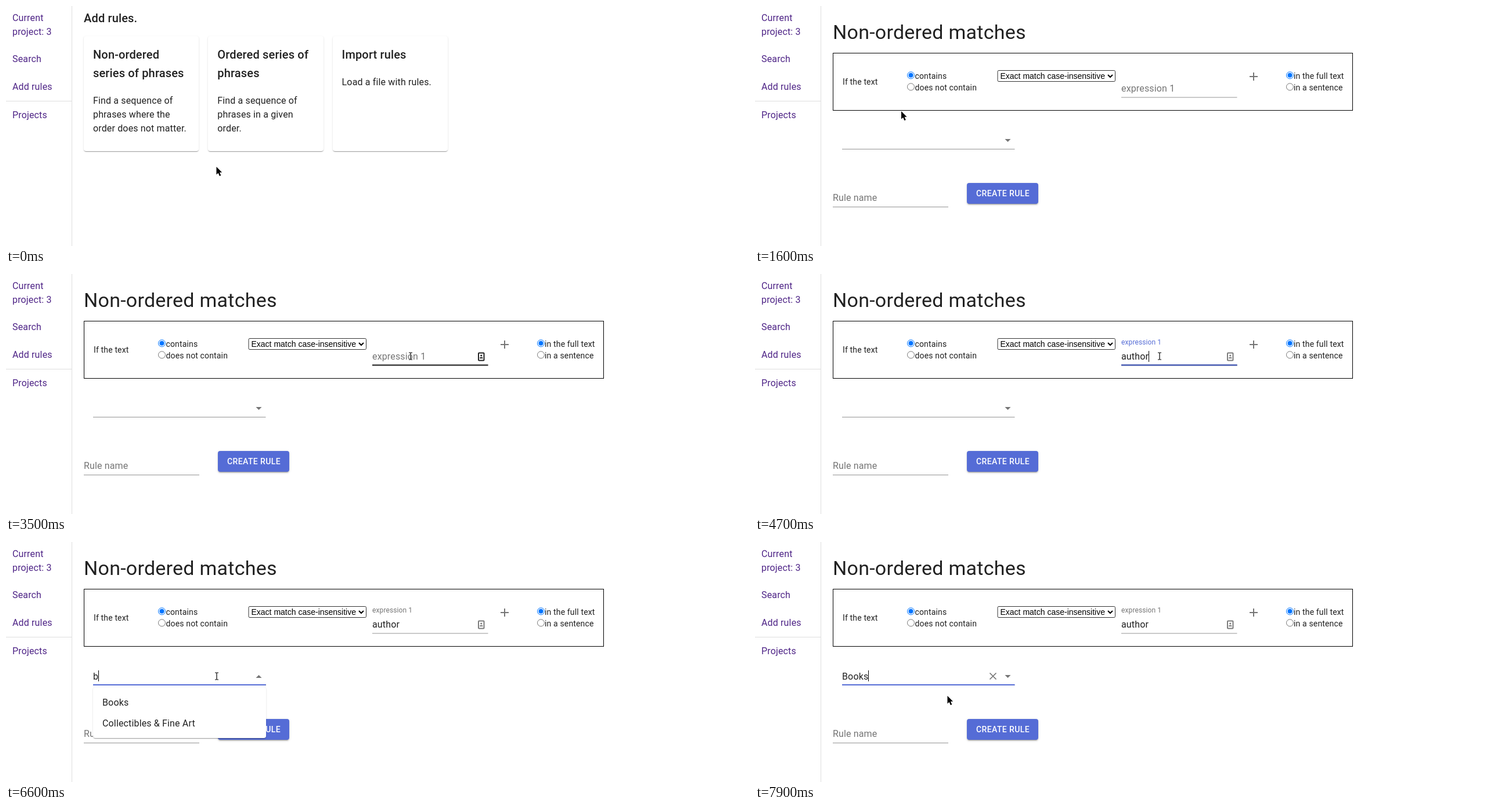
These frames come from a looping animation (1280 px wide and 415 px high, 8 s). An HTML page:

```html
<!DOCTYPE html>
<html lang="en">
<head>
<meta charset="utf-8">
<title>Add rules</title>
<style>
  html, body { margin: 0; width: 100%; height: 100%; overflow: hidden; background: #fff; }
  svg { display: block; }
  text { font: 16px Roboto, sans-serif; letter-spacing: .15px; fill: #212121; white-space: pre; }
  .nav text { fill: #4f2587; }
  .title { font-size: 20px; font-weight: 500; }
  .heading { font-size: 34px; letter-spacing: .25px; }
  .small text { font-size: 14px; }
  .small .select { font: 14px "Liberation Sans", Arial, sans-serif; letter-spacing: 0; fill: #000; }
  .hint { fill: #757575; }
  .button { font-size: 14px; font-weight: 500; letter-spacing: .4px; fill: #fff; }
  .line { fill: #949494; }
  .icon { fill: none; stroke: #757575; }
  foreignObject { overflow: visible; }
  .paper, .raised { height: 100%; border-radius: 4px; background: #fff;
    box-shadow: 0 2px 1px -1px rgba(0,0,0,.2), 0 1px 1px rgba(0,0,0,.14), 0 1px 3px rgba(0,0,0,.12); }
  .raised { background: #556cd6;
    box-shadow: 0 3px 1px -2px rgba(0,0,0,.2), 0 2px 2px rgba(0,0,0,.14), 0 1px 5px rgba(0,0,0,.12); }
  #cursor path { paint-order: stroke; stroke: #fff; stroke-width: 2; stroke-linejoin: round; }
</style>
</head>
<body>
<svg width="1280" height="415" viewBox="0 0 1280 415">
  <g class="nav">
    <text x="11" y="26">Current</text>
    <text x="11" y="50">project: 3</text>
    <text x="11" y="97">Search</text>
    <text x="11" y="145">Add rules</text>
    <text x="11" y="194">Projects</text>
    <path d="M113.5 0V415M0 164.5H113" stroke="#dedede"/>
  </g>

  <g id="menuPage"><text class="title" x="134" y="28">Add rules.</text></g>

  <g id="formPage">
    <text class="heading" x="134" y="57">Non-ordered matches</text>
    <rect x="134.5" y="81.5" width="895" height="99" fill="none" stroke="#000"/>
    <g class="small">
      <text x="151" y="136">If the text</text>
      <text x="275.5" y="126">contains</text>
      <text x="275.5" y="146">does not contain</text>
      <text x="928" y="126">in the full text</text>
      <text x="928" y="146">in a sentence</text>
      <g id="radios"></g>
      <rect id="select" x="418" y="111.5" width="202.5" height="19" rx="2" fill="#fff"/>
      <text class="select" x="422.5" y="126">Exact match case-insensitive</text>
      <path d="M608 119l4 4l4-4" fill="none" stroke="#000" stroke-width="2"/>
    </g>
    <path class="icon" d="M852 122h14M859 115v14" stroke-width="2"/>

    <text id="label" class="hint">expression 1</text>
    <text id="word" x="631" y="148"></text>
    <g id="card">
      <rect x="814" y="136.5" width="9.5" height="13" rx="1" fill="none" stroke-width="2"/>
      <circle cx="818.7" cy="141" r="1.6" stroke="none"/>
      <path d="M816 146v-1.3q2.7-2 5.4 0v1.3z" stroke="none"/>
    </g>
    <g id="wordLine"></g>

    <text id="category" x="150" y="238"></text>
    <path id="clear" class="icon" d="M404.500 226.500l11 11m0-11l-11 11" stroke-width="1.7"/>
    <path id="arrow" fill="#757575"/>
    <g id="categoryLine"></g>

    <text class="hint" x="134" y="337">Rule name</text>
    <rect class="line" x="134" y="347" width="199" height="1"/>
    <foreignObject x="365" y="306" width="123" height="36"><div class="raised"></div></foreignObject>
    <text class="button" x="381" y="329">CREATE RULE</text>

    <g id="popup">
      <foreignObject id="popupBox" x="150" y="251" width="297.500"><div class="paper"></div></foreignObject>
      <rect id="highlight" x="150" y="259" width="297.500" height="36" fill="#f5f5f5"/>
      <g id="options"></g>
    </g>
    <rect id="caret" width="1" height="19"/>
  </g>

  <g id="cursor">
    <path id="pointer" d="M0 0V13.500L3.100 10.700L5.400 16L7.800 15L5.500 9.800H9.600Z"/>
    <path id="beam" d="M-3-6.500h2.500l.5.500l.5-.5H3v1H.6V5.500H3v1H.5L0 6l-.5.500H-3v-1H-.6V-5.500H-3z" style="stroke-width:1"/>
    <path id="hand" d="M-1.500 1Q0-1 1.500 1V6Q3 5 4.300 6.500Q6 5.700 7 7.200Q9 6.500 9.500 8.500V12L8 17H-.5L-5 10.500Q-5 8.500-3 9.300L-1.500 11Z"/>
  </g>
</svg>

<script>
const $ = id => document.getElementById(id);
const LOOP = 8000, TICK = 100, BLUE = '#556cd6', DARK = '#212121';

// Static repeated parts
const cards = [
  [['Non-ordered', 'series of phrases'], ['Find a sequence of', 'phrases where the', 'order does not matter.']],
  [['Ordered series of', 'phrases'], ['Find a sequence of', 'phrases in a given', 'order.']],
  [['Import rules'], ['Load a file with rules.']],
];
cards.forEach(([title, body], i) => {
  const x = 134 + 214.3 * i, bodyTop = 105 + 32 * title.length;
  $('menuPage').innerHTML +=
    `<foreignObject x="${x}" y="52" width="198.3" height="199"><div class="paper"></div></foreignObject>` +
    title.map((s, n) => `<text class="title" x="${x + 16}" y="${91 + 32 * n}">${s}</text>`).join('') +
    body.map((s, n) => `<text x="${x + 16}" y="${bodyTop + 24 * n}">${s}</text>`).join('');
});

const radio = (x, y, on) => `<circle cx="${x}" cy="${y}" r="6" fill="#fff" stroke="${on ? '#0075ff' : '#767676'}"/>` +
  (on ? `<circle cx="${x}" cy="${y}" r="4" fill="#0075ff"/>` : '');
$('radios').innerHTML = [268.5, 921.5].map(x => radio(x, 119.8, true) + radio(x, 139.8, false)).join('');

const OPTIONS = ['Books', 'Collectibles &amp; Fine Art', 'Electronics', 'Fashion', 'Music'];
$('options').innerHTML = OPTIONS.map((s, i) => `<text x="166" y="${283 + 36 * i}">${s}</text>`).join('');

// Pointer way points: time, x, y
const path = [
  [0, 362.5, 278], [500, 362.5, 278], [700, 302, 230], [800, 268, 200], [900, 251, 185],
  [1000, 251, 185], [1100, 252, 182], [2100, 252, 182], [2600, 520, 127], [3000, 694, 142],
  [3400, 694, 142], [3500, 697, 142], [5100, 697, 142], [5200, 620, 160], [5300, 620, 160],
  [5700, 363, 232], [7200, 363, 232], [7500, 338, 263], [7600, 338, 263], [7700, 331.5, 266], [LOOP, 331.5, 266],
];

// Typed text: time, value
const wordKeys = [[0, ''], [4100, 'a'], [4200, 'au'], [4300, 'aut'], [4400, 'auth'], [4600, 'autho'], [4700, 'author']];
const categoryKeys = [[0, ''], [6600, 'b'], [6700, 'bo'], [7900, 'Books']];

const valueAt = (keys, t) => keys.filter(k => k[0] <= t).pop()[1];
const within = (t, from, to) => t >= from && t < to;
const show = (id, on) => $(id).setAttribute('visibility', on ? 'inherit' : 'hidden');
const set = (id, attrs) => { for (const k in attrs) $(id).setAttribute(k, attrs[k]); };

function pointerAt(t) {
  const i = Math.max(1, path.findIndex(p => p[0] >= t));
  const [t0, x0, y0] = path[i - 1], [t1, x1, y1] = path[i];
  const p = (t - t0) / (t1 - t0);
  return [x0 + (x1 - x0) * p, y0 + (y1 - y0) * p];
}

// Eased 200 ms transition
function ramp(t, start) {
  const p = Math.min(1, Math.max(0, (t - start + 50) / 200));
  return 1 - (1 - p) ** 2;
}

function underline(id, x, y, width, hover, focus) {
  const w = width * focus;
  $(id).innerHTML = `<rect class="line" x="${x}" y="${y}" width="${width}" height="1"/>` +
    (hover ? `<rect x="${x}" y="${y - 1}" width="${width}" height="2" fill="${DARK}"/>` : '') +
    `<rect x="${x + (width - w) / 2}" y="${y - 1}" width="${w}" height="2" fill="${BLUE}"/>`;
}

function draw(t) {
  const form = t >= 1600, open = within(t, 6000, 7900);
  const [x, y] = pointerAt(t);
  const over = (l, top, r, b) => x >= l && x <= r && y >= top && y <= b;
  const overWord = form && over(631, 128, 830, 158);
  const overCategory = form && over(150, 219, 447, 248);
  const overLink = form ? open && over(150, 259, 447, 295) : over(134, 52, 332, 251);

  $('menuPage').style.display = form ? 'none' : '';
  $('formPage').style.display = form ? '' : 'none';
  set('select', { stroke: over(418, 111, 620, 131) ? '#000' : '#333' });

  // Expression field
  const lift = ramp(t, 3800), blur = ramp(t, 6000);
  $('label').style.fontSize = 16 - 4 * lift + 'px';
  $('label').style.letterSpacing = .15 - .04 * lift + 'px';
  $('label').style.fill = within(t, 3800, 6000) ? BLUE : '';
  set('label', { x: 631, y: 148 - 26 * lift });
  $('word').textContent = valueAt(wordKeys, t);
  underline('wordLine', 631, 157.5, 199.5, overWord, t < 6000 ? lift : 1 - blur);
  const cardColor = t < 3800 ? '#222' : '#7c7c7c';
  set('card', { fill: cardColor, stroke: cardColor });
  show('card', overWord || t >= 3800);

  // Category field and its list
  const category = valueAt(categoryKeys, t);
  $('category').textContent = category;
  underline('categoryLine', 150, 247, 297.5, overCategory, blur);
  set('arrow', { d: open ? 'M430.500 235h10l-5-5z' : 'M430.500 230h10l-5 5z' });
  show('clear', t >= 7900);
  show('popup', open);
  show('highlight', open && t >= 7700);
  const count = ({ b: 2, bo: 1 })[category] || OPTIONS.length;
  set('popupBox', { height: 16 + 36 * count });
  [...$('options').children].forEach((o, i) => o.setAttribute('visibility', i < count ? 'inherit' : 'hidden'));

  const field = t < 6000 ? 'word' : 'category';
  const start = t < 6000 ? 631 : 150;
  set('caret', { x: Math.round(start + $(field).getComputedTextLength()), y: t < 6000 ? 133 : 222 });
  show('caret', within(t, 3800, 5500) || within(t, 6000, 7300) || t >= 7900);

  // Pointer shape follows what lies under it
  const beam = overWord || overCategory;
  set('cursor', { transform: `translate(${x} ${y})` });
  show('beam', beam);
  show('hand', overLink);
  show('pointer', !beam && !overLink);
}

function frame() {
  const t = performance.now() % LOOP;
  draw(Math.floor(t / TICK) * TICK);
  requestAnimationFrame(frame);
}
frame();
</script>
</body>
</html>
```
